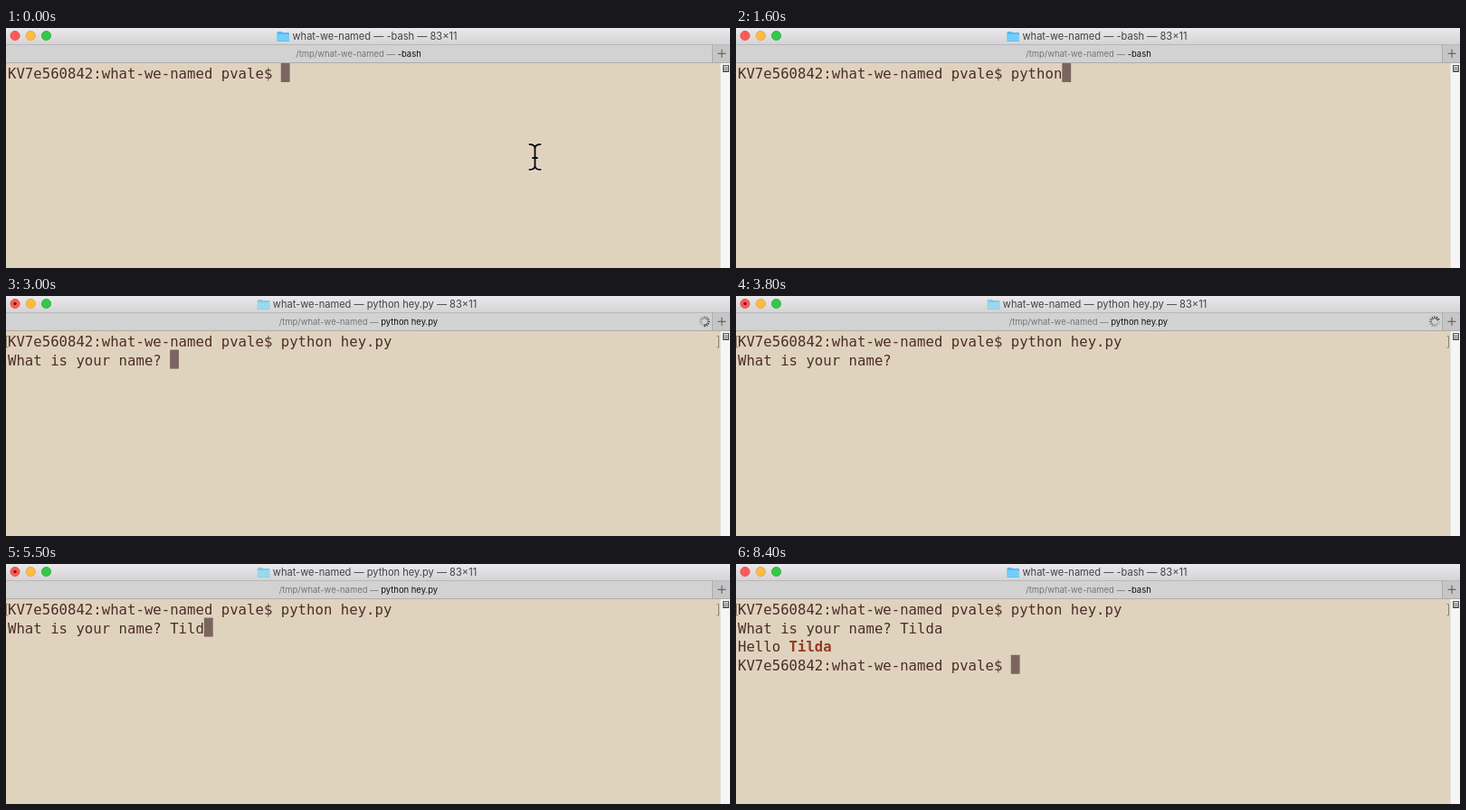
Recreate the animation shown at these times as an HTML page with a canvas. Size 800x266 px, loop 8.5 s.

```html
<!DOCTYPE html>
<html lang="en">
<head>
<meta charset="utf-8">
<title>Terminal greeting</title>
<style>
  html, body { margin: 0; width: 100%; height: 100%; overflow: hidden; background: #e0d3bd; }
  canvas { display: block; width: 800px; height: 266px; }
</style>
</head>
<body>
<canvas id="stage" width="800" height="266"></canvas>
<script>
const canvas = document.getElementById('stage');
const ctx = canvas.getContext('2d');

const LOOP = 8500, STEP = 100;
const COL = 9.43, ROW = 20.6, LEFT = 2, TOP = 39;
const MONO = '"DejaVu Sans Mono", monospace';
const SANS = 'Inter, Roboto, sans-serif';
const INK = '#4c2c2a';

const FOLDER = 'what-we-named';
const PROMPT = `KV7e560842:${FOLDER} pvale$ `;
const COMMAND = 'python hey.py';
const QUESTION = 'What is your name? ';
const NAME = 'Tilda';

// Times of each step in the session
const TAB_KEY = 2100, RUN = 2700, ASK = 2800, SPIN_END = 4600, SUBMIT = 5900, EXIT = 6000;
const commandKeys = Array.from({ length: 9 }, (_, i) => 1100 + i * 100);
const nameKeys = [4900, 5100, 5300, 5450, 5650];
const resets = [0, ...commandKeys, TAB_KEY, RUN, ASK, ...nameKeys, SUBMIT, EXIT];

const clamp = v => Math.max(0, Math.min(1, v));
const countPast = (times, t) => times.filter(k => k <= t).length;

function rect(x, y, w, h, color) {
  ctx.fillStyle = color;
  ctx.fillRect(x, y, w, h);
}

function disc(x, y, r, color, edge) {
  ctx.beginPath();
  ctx.arc(x, y, r, 0, Math.PI * 2);
  ctx.fillStyle = color;
  ctx.fill();
  if (edge) {
    ctx.strokeStyle = edge;
    ctx.lineWidth = 0.8;
    ctx.stroke();
  }
}

function line(color, width, ...points) {
  ctx.beginPath();
  points.forEach(([x, y]) => ctx.lineTo(x, y));
  ctx.strokeStyle = color;
  ctx.lineWidth = width;
  ctx.stroke();
}

function label(text, x, y, size, color) {
  ctx.font = `${size}px ${SANS}`;
  ctx.fillStyle = color;
  ctx.fillText(text, x, y);
}

function labelWidth(text, size) {
  ctx.font = `${size}px ${SANS}`;
  return ctx.measureText(text).width;
}

// Terminal text sits on a fixed character grid
function cells(text, col, row, color = INK, weight = '') {
  ctx.font = `${weight} 15.66px ${MONO}`;
  ctx.fillStyle = color;
  [...text].forEach((ch, i) =>
    ctx.fillText(ch, LEFT + (col + i) * COL, TOP + 17 + row * ROW));
}

function folderIcon(x, busy) {
  ctx.beginPath();
  ctx.roundRect(x, 4, 6, 5, 1);
  ctx.roundRect(x, 5, 13.5, 10, 1);
  ctx.fillStyle = busy ? '#83c9e2' : '#58b9ee';
  ctx.fill();
  rect(x, 7, 13.5, 7.4, busy ? '#9ad8ec' : '#74cdf9');
}

function chrome(t) {
  const busy = t >= ASK && t < EXIT;
  const bar = ctx.createLinearGradient(0, 0, 0, 18);
  bar.addColorStop(0, '#ebe9eb');
  bar.addColorStop(1, '#d5d3d5');
  rect(0, 0, 800, 18, bar);
  rect(0, 18, 800, 20, '#d2d2d2');
  rect(781, 18, 19, 20, '#c6c6c6');
  rect(0, 18, 800, 1, '#b9b9b9');
  rect(0, 38, 800, 1, '#b0aca6');
  rect(780, 18, 1, 20, '#adadad');

  disc(10, 8.5, 5.1, '#fc5b57', '#df4744');
  disc(27.3, 8.5, 5.1, '#fdbc40', '#de9f34');
  disc(44.5, 8.5, 5.1, '#34c84a', '#27a935');
  if (busy) disc(10, 8.5, 1.7, '#7c100c');

  const job = busy ? COMMAND : '-bash';
  const title = `${FOLDER} — ${job} — 83×11`;
  const titleX = 399 - (labelWidth(title, 11.1) + 17) / 2;
  folderIcon(titleX, busy);
  label(title, titleX + 17, 13, 11.1, '#434343');

  const path = `/tmp/${FOLDER} — `;
  const pathWidth = labelWidth(path, 9.45);
  const tabX = 389.5 - (pathWidth + labelWidth(job, 9.45)) / 2;
  label(path, tabX, 31.6, 9.45, '#757575');
  label(job, tabX + pathWidth, 31.6, 9.45, '#111');

  line('#5c5c5c', 1.1, [786.5, 28.3], [795.5, 28.3]);
  line('#5c5c5c', 1.1, [791, 23.8], [791, 32.8]);
  if (t >= ASK && t < SPIN_END) spinner(t);
}

function spinner(t) {
  const lead = Math.floor(t / 100);
  for (let i = 0; i < 12; i++) {
    const a = i * Math.PI / 6;
    const age = ((lead - i) % 12 + 12) % 12;
    const x = Math.sin(a), y = -Math.cos(a);
    line(`rgba(35,35,35,${1 - age * 0.075})`, 1.2,
      [772 + x * 3, 28.3 + y * 3], [772 + x * 6, 28.3 + y * 6]);
  }
}

function scrollStrip() {
  rect(789, 39, 11, 227, '#f6f5f4');
  rect(789, 39, 1, 227, '#e6e3df');
  ctx.strokeStyle = '#555';
  ctx.lineWidth = 1;
  ctx.strokeRect(792.5, 41.5, 6, 7);
  rect(793, 43, 5, 1, '#777');
  rect(793, 45, 5, 1, '#555');
  rect(793, 47, 5, 1, '#777');
}

function blink(t) {
  const since = t - resets.filter(k => k <= t).pop();
  if (since < 700) return 1;
  const p = since % 1000;
  return p < 500 ? clamp(p / 300) : clamp((900 - p) / 300);
}

function block(col, row, t) {
  ctx.globalAlpha = blink(t);
  rect(LEFT + col * COL, TOP + row * ROW, COL + 0.4, 21, '#7a6560');
  ctx.globalAlpha = 1;
}

function session(t) {
  const typed = t >= TAB_KEY ? COMMAND + ' ' : COMMAND.slice(0, countPast(commandKeys, t));
  cells(PROMPT + typed, 0, 0);
  if (t < RUN) return block(PROMPT.length + typed.length, 0, t);

  const mark = '#8d8178';
  line(mark, 1, [2.5, 44.5], [0.5, 44.5], [0.5, 57], [2.5, 57]);
  line(mark, 1, [785.5, 44.5], [787.5, 44.5], [787.5, 57], [785.5, 57]);
  if (t < ASK) return block(0, 1, t);

  const answer = QUESTION + NAME.slice(0, countPast(nameKeys, t));
  cells(answer, 0, 1);
  if (t < SUBMIT) return block(answer.length, 1, t);
  if (t < EXIT) return block(0, 2, t);

  cells('Hello ', 0, 2);
  cells(NAME, 6, 2, '#943923', 'bold');
  cells(PROMPT, 0, 3);
  block(PROMPT.length, 3, t);
}

function pointer(t) {
  if (t >= 900) return;
  const u = clamp(t / 700);
  const e = u * u * (3 - 2 * u);
  ctx.save();
  ctx.translate(584.5 + 108 * e, 143 + 3 * e + 6 * Math.sin(Math.PI * e));
  ctx.lineCap = 'round';
  const beam = (color, width) => {
    ctx.beginPath();
    for (const s of [-1, 1]) {
      ctx.moveTo(-6, 14 * s);
      ctx.quadraticCurveTo(-0.5, 14 * s, 0, 10 * s);
      ctx.quadraticCurveTo(0.5, 14 * s, 6, 14 * s);
    }
    ctx.moveTo(0, -11);
    ctx.lineTo(0, 11);
    ctx.moveTo(-2.5, 1);
    ctx.lineTo(2.5, 1);
    ctx.strokeStyle = color;
    ctx.lineWidth = width;
    ctx.stroke();
  };
  beam('rgba(255,255,255,0.45)', 3.6);
  beam('#0c0c0c', 2);
  ctx.restore();
}

function draw(t) {
  rect(0, 0, 800, 266, '#e0d3bd');
  chrome(t);
  scrollStrip();
  session(t);
  pointer(t);
}

const start = performance.now();
function tick() {
  const t = Math.max(0, performance.now() - start) % LOOP;
  draw(Math.floor(t / STEP) * STEP);
  requestAnimationFrame(tick);
}
tick();
</script>
</body>
</html>
```
